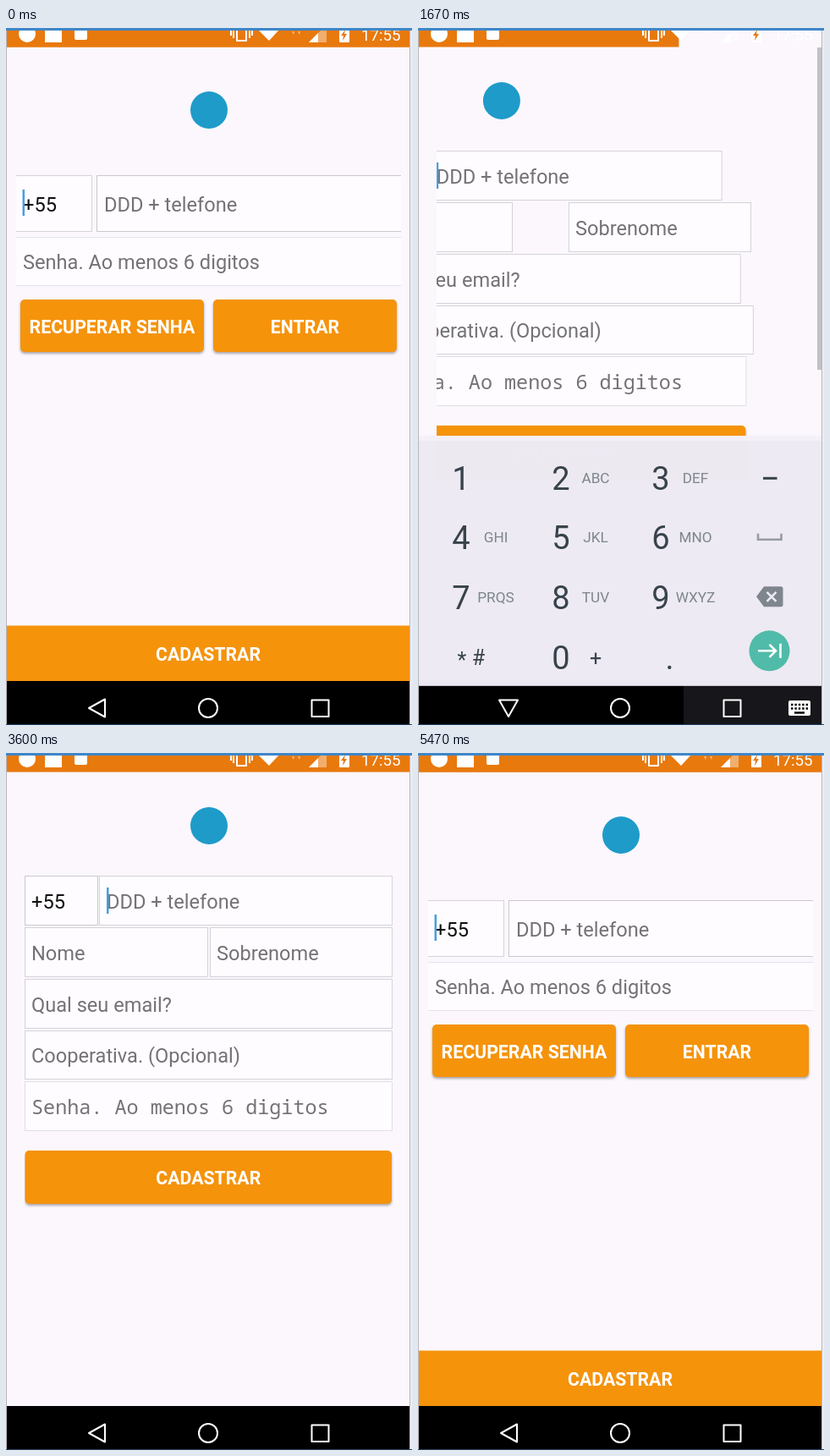
Recreate the animation shown at these times as an HTML page. Size 480 by 824 pixels, loop 5540 ms.

```html
<!DOCTYPE html>
<html lang="pt-BR">
<head>
<meta charset="utf-8">
<title>Cadastro</title>
<style>
  html, body { margin: 0; width: 100%; height: 100%; overflow: hidden; background: #fbf7fd; }
  svg { display: block; width: 100vw; height: 100vh; }
  text { font: 23.6px Roboto, sans-serif; fill: #747276; white-space: pre; }
  .dark { fill: #111; }
  .mono { font: 23.45px "Noto Sans Mono", monospace; }
  .action { font-size: 21.3px; font-weight: 700; fill: #fff; text-anchor: middle; }
  .digit { font-size: 38px; fill: #37424b; text-anchor: middle; }
  .letters { font-size: 17.2px; fill: #7d868d; text-anchor: middle; }
  .symbol { font-size: 25px; fill: #37424b; text-anchor: middle; }
  .clock { font-size: 18.7px; fill: #fff; }
  .status { fill: #e8790d; }
  .orange { fill: #f5930b; }
  .raised { filter: drop-shadow(0 2px 1.5px #0005); }
  .logo { fill: #1e9bc9; }
  .caret { fill: #479fd9; }
  .line { fill: none; stroke: #fff; stroke-width: 2; stroke-linejoin: round; }
</style>
</head>
<body>
<svg viewBox="0 0 480 824" preserveAspectRatio="none">
  <defs>
    <clipPath id="loginClip"><rect x="12" y="160" width="455" height="240"/></clipPath>
    <clipPath id="formClip"><rect x="22" y="140" width="436" height="410"/></clipPath>
    <clipPath id="statusClip"><rect y="3" width="480" height="20"/></clipPath>
  </defs>
  <rect width="480" height="824" fill="#fbf7fd"/>
  <rect id="statusBase" class="status" y="2" width="480" height="20.5"/>
  <rect id="navBase" y="772" width="480" height="52" fill="#17161a"/>
  <g id="login"></g>
  <g id="form"></g>
  <rect id="scrollbar" x="472" y="23" width="6" height="381" fill="#c3c0c6"/>

  <g clip-path="url(#statusClip)" fill="#fff">
    <circle cx="25" cy="7" r="10"/>
    <rect x="46" y="-3" width="20" height="20"/>
    <rect x="81" y="-1" width="15" height="15" rx="2"/>
    <path d="M273-8V15H284V-8M269-4V12M288-4V12" class="line"/>
    <path d="M266 0V9M291 0V9" class="line"/>
    <path d="M298 2H323L311 15Z"/>
    <path d="M338 4h3l-1 4zM345 4h3l-1 4z" opacity=".5"/>
    <path d="M379-4V17H358Z" opacity=".4"/>
    <path d="M369 6V17H358Z"/>
    <rect x="394" y="-2" width="12" height="19" rx="1"/>
    <path d="M401 2l-5 7h3l-1 6 5-8h-3z" class="status"/>
    <text x="420" y="14.5" class="clock">17:55</text>
  </g>

  <rect id="ripple" x="49" y="772" width="117" height="60" rx="28" fill="#2c2b2d"/>
  <g class="line">
    <path id="back" d="M117 793.5V814.5L98 804Z"/>
    <path id="hide" d="M96 794.5H118L107 814Z"/>
    <circle cx="239" cy="804" r="11"/>
    <rect x="361.5" y="794.5" width="20" height="19.5"/>
  </g>
  <g id="imeIcon">
    <rect x="438" y="795" width="26" height="18" rx="2" fill="#fff"/>
    <path d="M441 800H461M441 804.5H461" stroke="#000" stroke-width="2.4" stroke-dasharray="2.4 2"/>
    <path d="M445 809.5H457" stroke="#000" stroke-width="2.4"/>
  </g>
  <g id="keyboard"><rect x="1" y="482" width="476" height="12" fill="#f5f1f9"/><g id="keys"></g></g>

  <path d="M.5 0V824" stroke="#b9b6bc"/>
  <rect x="477" y="3" width="1" height="821" fill="#b9b6bd"/>
  <rect x="478" y="3" width="2" height="821" fill="#eeebf3"/>
  <rect width="480" height="3" fill="#3f86c8"/>
  <rect y="823" width="480" height="1" fill="#1d3f63"/>
</svg>
<script>
const $ = id => document.getElementById(id);
const LOOP = 5540, WIDTH = 478, MID_Y = 412;

// Parts nearer the right edge and the middle height enter first.
const part = (cx, cy, body) => {
  const delay = (WIDTH - cx + Math.abs(cy - MID_Y)) / WIDTH / 3;
  return `<g data-delay="${delay}">${body}</g>`;
};
const label = (x, y, text, cls = '') => `<text x="${x}" y="${y}" class="${cls}">${text}</text>`;
const logo = y => part(240, y, `<circle class="logo" cx="240" cy="${y}" r="22"/>`);
const caret = (id, x, y) => `<rect id="${id}" class="caret" x="${x}" y="${y}" width="2.5" height="31"/>`;
const bars = part(239, 12, '<rect class="status" y="2" width="478" height="20.5"/>') +
  part(239, 798, '<rect y="772" width="478" height="52"/>');

function field(x, y, w, h, text, { edge = '#d5d2d9', cls = '', extra = '', textX = x + 8, cy = y + h / 2 } = {}) {
  return part(x + w / 2, cy,
    `<rect x="${x + .5}" y="${y + .5}" width="${w - 1}" height="${h - 1}" fill="#fefcff" stroke="${edge}"/>` +
    label(textX, y + h / 2 + 9, text, cls) + extra);
}

function button(x, y, w, h, text, flat) {
  const look = flat ? 'class="orange"' : 'class="orange raised" rx="5"';
  return part(x + w / 2, y + h / 2, `<rect x="${x}" y="${y}" width="${w}" height="${h}" ${look}/>` +
    label(x + w / 2, y + h / 2 + 8.5, text, 'action'));
}

$('login').innerHTML = bars + logo(97) +
  `<g clip-path="url(#loginClip)">` +
  field(11, 174, 91, 67, '+55', { textX: 20, cls: 'dark', extra: caret('loginCaret', 19.5, 191) }) +
  field(107, 174, 361, 67, 'DDD + telefone', { textX: 116, edge: '#cbc8cf' }) +
  field(11, 247, 457, 58, 'Senha. Ao menos 6 digitos', { textX: 20, edge: '#e6e2ea' }) +
  button(17, 321, 217, 62, 'RECUPERAR SENHA') +
  button(245, 321, 217, 62, 'ENTRAR') + `</g>` +
  button(0, 706.5, 478, 65.5, 'CADASTRAR', true);

$('form').innerHTML = bars + logo(86) +
  `<g clip-path="url(#formClip)">` +
  field(22, 145, 87, 59, '+55', { cls: 'dark', edge: '#cbc8cf' }) +
  field(110, 145, 347, 59, 'DDD + telefone', { textX: 119, extra: caret('formCaret', 119, 159) }) +
  field(22, 206, 217, 59, 'Nome') +
  field(241, 206, 216, 59, 'Sobrenome') +
  field(22, 267, 435, 59, 'Qual seu email?') +
  field(22, 328, 435, 58, 'Cooperativa. (Opcional)') +
  // the password field travels together with the button
  field(22, 388, 435, 59, 'Senha. Ao menos 6 digitos', { cls: 'mono', edge: '#e2dee6', cy: 501.5 }) +
  button(22.5, 470, 433.5, 63, 'CADASTRAR') + `</g>`;

const letters = ['', 'ABC', 'DEF', 'GHI', 'JKL', 'MNO', 'PRQS', 'TUV', 'WXYZ'];
$('keys').innerHTML = `<rect x="1" y="482" width="476" height="290" fill="#edeaf3"/>` +
  letters.map((text, i) => {
    const x = 51 + i % 3 * 118, y = 540 + Math.floor(i / 3) * 70.5;
    return label(x, y, i + 1, 'digit') + label(x + 41, y - 8, text, 'letters');
  }).join('') +
  label(169, 752, '0', 'digit') + label(210, 748, '+', 'symbol') +
  label(52, 750, '*', 'symbol') + label(71.5, 747, '#', 'symbol') + label(297.5, 752, '.', 'digit') + `
  <rect x="408" y="525" width="16.5" height="3" fill="#37424b"/>
  <path d="M402 592V599H429.5V592" fill="none" stroke="#979ba2" stroke-width="2.6"/>
  <path d="M409 654.5H429Q431.5 654.5 431.5 657V676Q431.5 678.5 429 678.5H409L400 666.5Z" fill="#7f868e"/>
  <path d="M412.5 661L423.5 672M423.5 661L412.5 672" stroke="#edeaf3" stroke-width="2.6"/>
  <circle cx="415.5" cy="730.5" r="24" fill="#50bba9"/>
  <path d="M402 730.5H423M415.5 723L423 730.5L415.5 738M428.5 722V739" fill="none" stroke="#fff" stroke-width="2.6"/>`;

const SLIDE = 300, MAX_DELAY = .46, BLINK = 1010;
const LOGIN_OUT = 1270, FORM_IN = 1416, FORM_OUT = 4130, LOGIN_IN = 4274;
const IME_IN = 1575, IME_OUT = 2740, IME_GONE = 2890;

const clamp = v => Math.min(1, Math.max(0, v));
const ramp = (t, from, to) => clamp((t - from) / (to - from));
const show = (id, on) => $(id).style.display = on ? '' : 'none';
const blink = (t, since) => t >= since && (t - since) % BLINK < BLINK / 2;

// Both return the part's distance left of its place.
const entering = (t, start, delay) => WIDTH * (1 - clamp((t - start) / SLIDE - delay)) ** 2;
const leaving = (t, start, delay) => WIDTH * clamp((t - start) / SLIDE - (MAX_DELAY - delay)) ** 2;

function place(page, shiftOf) {
  for (const el of $(page).querySelectorAll('[data-delay]'))
    el.setAttribute('transform', `translate(${-shiftOf(+el.dataset.delay)} 0)`);
}

function draw(time) {
  const t = time % LOOP;
  const away = t >= LOGIN_OUT && t < FORM_OUT;

  place('login', d => Math.min(leaving(t, LOGIN_OUT, d), entering(t, LOGIN_IN, d)));
  place('form', d => Math.max(entering(t, FORM_IN, d), leaving(t, FORM_OUT, d)));
  show('statusBase', !away);
  show('navBase', away);

  show('loginCaret', blink(t, t < FORM_IN ? 0 : 4400));
  show('formCaret', blink(t, 1570));

  const typing = t >= IME_IN && t < IME_GONE;
  const rise = (1 - ramp(t, IME_IN, IME_IN + 300)) ** 5;
  const veil = (1 - ramp(t, IME_IN, IME_IN + 150)) ** 5;
  const closing = ramp(t, IME_OUT, IME_GONE);
  $('keyboard').style.opacity = (1 - veil) * (1 - closing);
  $('keys').setAttribute('transform', `translate(0 ${40 * (rise + closing ** 2)})`);
  for (const id of ['keyboard', 'scrollbar', 'imeIcon', 'hide']) show(id, typing);
  show('back', !typing);
  $('ripple').style.opacity = ramp(t, 2580, 2650) * (1 - ramp(t, 2720, 2920));
}

const start = performance.now();
function tick() {
  draw(performance.now() - start);
  requestAnimationFrame(tick);
}
tick();
</script>
</body>
</html>
```
